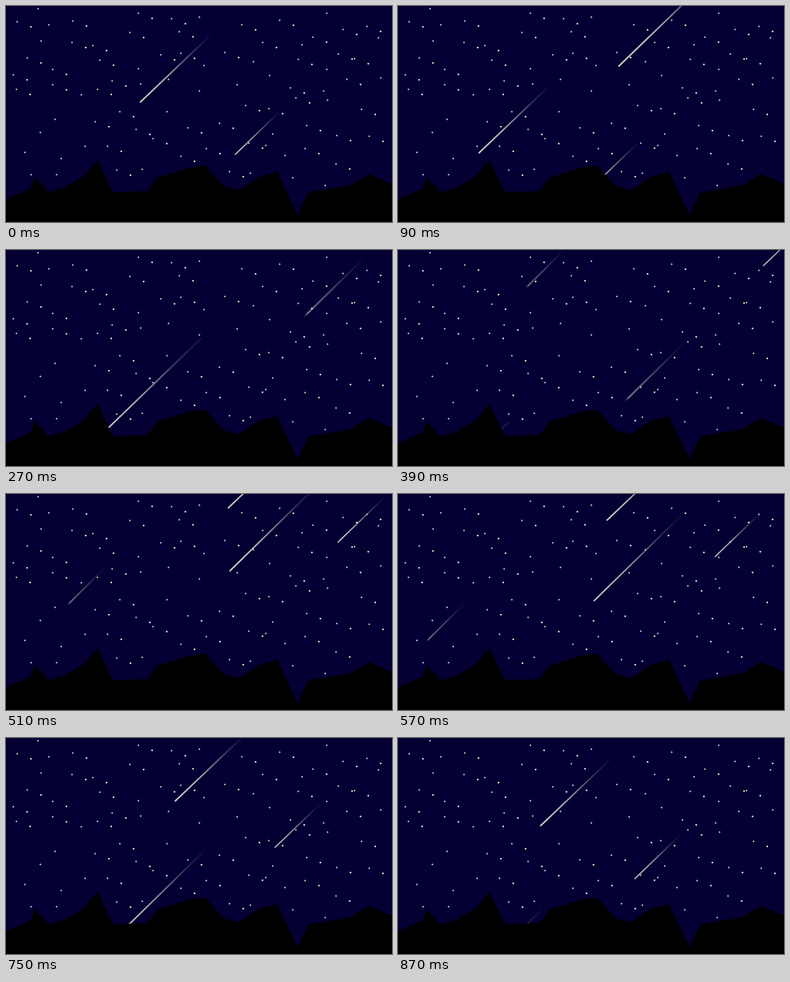
An HTML page without scripts that plays this animation: 500 px wide and 281 px high, repeating every 0.9 s.

```html
<!DOCTYPE html>
<html lang="en">
<head>
<meta charset="utf-8">
<title>Meteor shower</title>
<style>
  html, body { margin: 0; height: 100%; overflow: hidden; background: #040033; }
  svg { display: block; width: 100vw; height: 100vh; }
  .stars { fill: none; stroke: #f6f6e0; stroke-width: 1.9; stroke-linecap: round; }
  .bright { stroke: #f8f8cc; stroke-width: 2.3; }

  /* --x, --y: head at the loop start; --dx, --dy: travel per 30 ms tick */
  .meteor { animation: fly .9s steps(30) -1ms infinite; }
  .late { animation-name: fly-late; animation-timing-function: steps(1); }
  @keyframes fly {
    from { transform: translate(var(--x), var(--y)); }
    to {
      transform: translate(calc(var(--x) + 30 * var(--dx)), calc(var(--y) + 30 * var(--dy)));
    }
  }
  @keyframes fly-late {
    0% { transform: translate(393px, -10px); }
    43.333% { transform: translate(393px, -10px); animation-timing-function: steps(4); }
    56.667% { transform: translate(289px, 100px); animation-timing-function: steps(13); }
    100% { transform: translate(55px, 353px); }
  }
</style>
</head>
<body>
<svg viewBox="0 0 500 281" preserveAspectRatio="none">
  <defs>
    <linearGradient id="glow">
      <stop offset="0" stop-color="#ffe" stop-opacity=".5"/>
      <stop offset=".07" stop-color="#ffffe6"/>
      <stop offset=".5" stop-color="#f0f0d8" stop-opacity=".85"/>
      <stop offset="1" stop-color="#d8d8d8" stop-opacity=".2"/>
    </linearGradient>
    <!-- unit streak: head at the origin, tail at x = 1 -->
    <path id="streak" d="M0 0 .07-1 1-.3V.3L.07 1Z"/>
    <path id="pairs" d="M14 20h0M86 19h0M85 47h0M171 9h0M214 16h0M160 34h0M224 33h0M27 67h0M60 82h0M121 70h0
      M137 97h0M200 63h0M226 61h0M305 24h0M354 18h0M332 47h0M397 40h0M378 69h0M436 30h0M467 26h0
      M430 62h0M9 89h0M13 108h0M60 102h0M118 108h0M283 60h0M441 95h0M368 106h0M375 119h0M310 129h0
      M340 133h0M460 134h0M389 155h0M428 168h0M470 169h0M147 137h0M115 150h0M168 160h0M190 172h0
      M235 158h0M276 152h0M259 185h0M226 195h0M131 182h0M314 178h0M387 185h0M289 215h0M427 205h0
      M112 51h0M451 68h0M143 213h0"/>
  </defs>

  <rect width="500" height="281" fill="#040033"/>

  <g transform="translate(.5 .5)">
    <g class="stars">
      <use href="#pairs"/>
      <use href="#pairs" class="bright" x="17.8" y="6.6"/>
      <path d="M41 3h0M55 24h0M45 45h0M97 115h0M250 14h0M250 110h0M256 77h0M320 72h0M299 102h0M341 90h0
        M383 50h0M415 9h0M415 82h0M411 110h0M416 122h0M485 93h0M482 41h0M171 81h0M174 101h0M210 95h0
        M208 137h0M63 147h0M44 164h0M71 198h0M24 190h0M102 182h0M32 219h0M65 219h0M176 212h0M316 217h0
        M336 181h0M345 166h0M361 194h0M371 223h0M413 233h0"/>
    </g>

    <g fill="url(#glow)">
      <g class="meteor" style="--x:367.5px;--y:-4px;--dx:-27.5px;--dy:27.4px">
        <use href="#streak" transform="rotate(-44.1) scale(184 1)"/>
      </g>
      <g class="meteor" style="--x:592px;--y:-159.6px;--dx:-23px;--dy:27.4px" opacity=".5">
        <use href="#streak" transform="rotate(-44.6) scale(108 1.1)"/>
      </g>
      <g class="meteor" style="--x:444.5px;--y:-259.8px;--dx:-21.5px;--dy:23.75px" opacity=".5">
        <use href="#streak" transform="rotate(-45) scale(69 .8)"/>
      </g>
      <g class="meteor late">
        <use href="#streak" transform="rotate(-44.5) scale(157 .9)"/>
      </g>
      <g class="meteor" style="--x:433.2px;--y:-118px;--dx:-8.6px;--dy:8px">
        <use href="#streak" transform="rotate(-43.7) scale(125 .9)"/>
      </g>
      <g class="meteor" style="--x:173px;--y:125px;--dx:-23px;--dy:22px">
        <use href="#streak" transform="rotate(-43.7) scale(126 .9)"/>
      </g>
      <g class="meteor" style="--x:296px;--y:193px;--dx:-15px;--dy:14px">
        <use href="#streak" transform="rotate(-44) scale(79 .75)"/>
      </g>
      <g class="meteor" style="--x:608px;--y:-112px;--dx:-10.42px;--dy:10.17px">
        <use href="#streak" transform="rotate(-44) scale(80 .75)"/>
      </g>
    </g>

    <path d="M-1 251 32 237 37 222 55 242 77 235 100 221 118 200 138 242 183 240 195 223 240 209 257 207
      282 234 302 239 328 221 351 216 377 272 391 242 445 233 470 218 500 231V281H-1Z"/>
  </g>
</svg>
</body>
</html>
```
